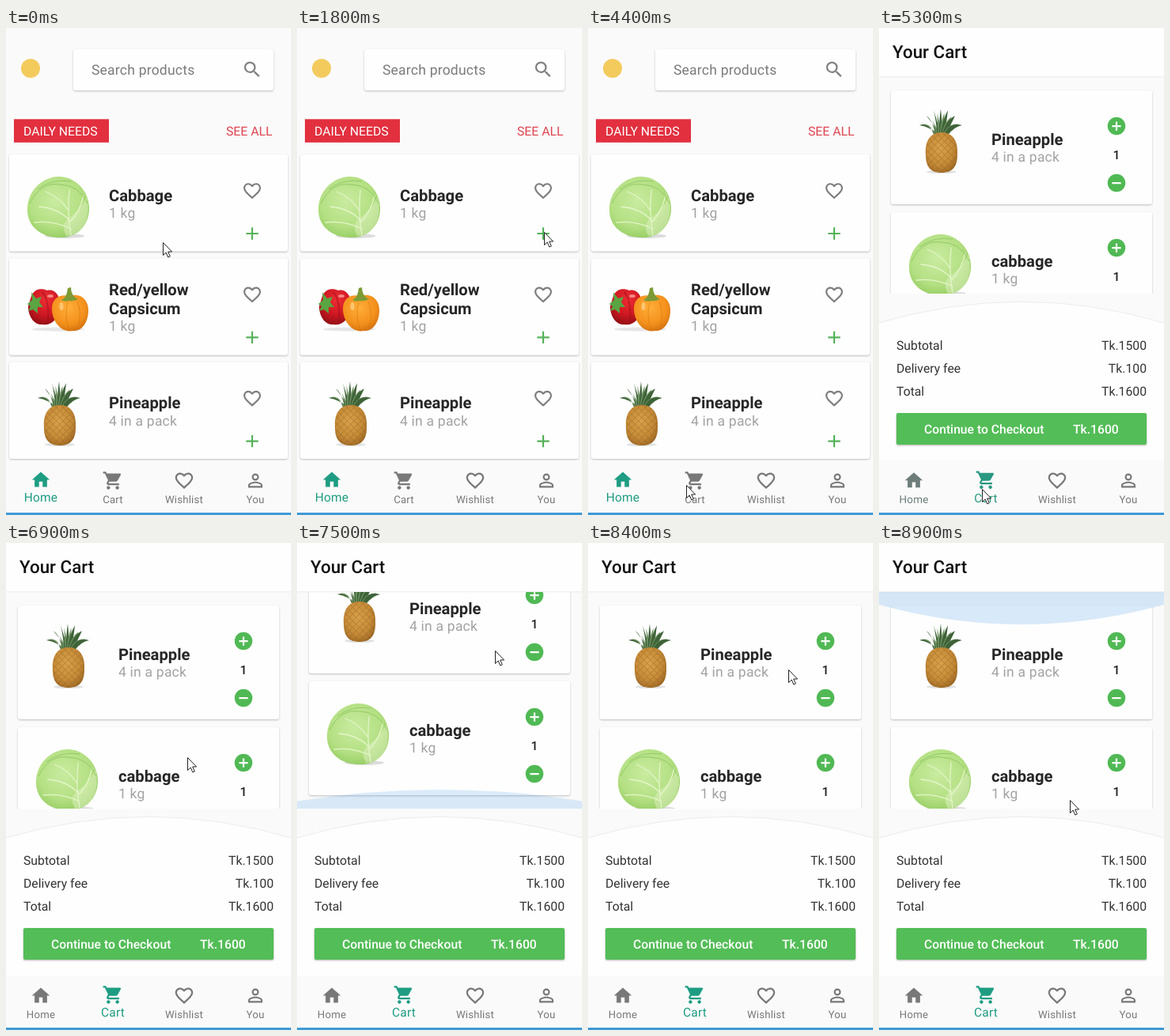
Write an HTML page that moves like this. It is 360 by 616 pixels and loops after 9 s.

```html
<!DOCTYPE html>
<html lang="en">
<head>
<meta charset="utf-8">
<title>Grocery cart</title>
<style>
  html, body { margin: 0; width: 100%; height: 100%; overflow: hidden; background: #fafafa; }
  svg { display: block; width: 360px; height: 616px; font-family: Roboto, sans-serif; text-rendering: geometricPrecision; }
  .card { fill: #fefefe; filter: drop-shadow(0 1px 1px rgba(0, 0, 0, .24)); }
  .title { font-size: 20.2px; font-weight: 700; fill: #262626; }
  .sub { font-size: 17.5px; letter-spacing: .22px; fill: #a2a2a2; }
  .hint { font-size: 17.5px; letter-spacing: .22px; fill: #7a7a7a; }
  .label { font-size: 15.77px; }
  .medium { font-size: 15.7px; font-weight: 500; }
  .head { font-size: 22.4px; font-weight: 500; fill: #111; }
  .tab { letter-spacing: .2px; }
</style>
</head>
<body>
<svg id="stage" viewBox="0 0 360 616" xmlns="http://www.w3.org/2000/svg"></svg>
<script>
const LOOP = 9000, STEP = 100;
const RED = '#e2303f', GREEN = '#55b259', SOFT = '#7f7f7f', GREY = [120, 120, 120], TEAL = [30, 157, 131];
const LIST_TOP = 62, LIST_END = 336, MAX_SCROLL = 58, SLOP = 18;

const PATHS = {
  search: 'M15.5 14h-.79l-.28-.27A6.47 6.47 0 0 0 16 9.5 6.5 6.5 0 1 0 9.5 16c1.61 0 3.09-.59 4.23-1.57l.27.28v.79l5 4.99L20.49 19zm-6 0C7.01 14 5 11.99 5 9.5S7.01 5 9.5 5 14 7.01 14 9.5 11.99 14 9.5 14z',
  heart: 'M16.5 3c-1.74 0-3.41.81-4.5 2.09C10.91 3.81 9.24 3 7.5 3 4.42 3 2 5.42 2 8.5c0 3.78 3.4 6.86 8.55 11.54L12 21.35l1.45-1.32C18.6 15.36 22 12.28 22 8.5 22 5.42 19.58 3 16.5 3zm-4.4 15.55l-.1.1-.1-.1C7.14 14.24 4 11.39 4 8.5 4 6.5 5.5 5 7.5 5c1.54 0 3.04.99 3.57 2.36h1.87C13.46 5.99 14.96 5 16.5 5c2 0 3.5 1.5 3.5 3.5 0 2.89-3.14 5.74-7.9 10.05z',
  home: 'M10 20v-6h4v6h5v-8h3L12 3 2 12h3v8z',
  cart: 'M7 18c-1.1 0-2 .9-2 2s.9 2 2 2 2-.9 2-2-.9-2-2-2zM1 2v2h2l3.6 7.59-1.35 2.45c-.16.28-.25.61-.25.96 0 1.1.9 2 2 2h12v-2H7.42c-.14 0-.25-.11-.25-.25l.03-.12.9-1.63h7.45c.75 0 1.41-.41 1.75-1.03l3.58-6.49A1 1 0 0 0 20 4H5.21l-.94-2zM17 18c-1.1 0-2 .9-2 2s.9 2 2 2 2-.9 2-2-.9-2-2-2z',
  person: 'M12 5.9a2.1 2.1 0 1 1 0 4.2 2.1 2.1 0 0 1 0-4.2m0 9c2.97 0 6.1 1.46 6.1 2.1v1.1H5.9V17c0-.64 3.13-2.1 6.1-2.1M12 4C9.79 4 8 5.79 8 8s1.79 4 4 4 4-1.79 4-4-1.79-4-4-4zm0 9c-2.67 0-8 1.34-8 4v3h16v-3c0-2.66-5.33-4-8-4z',
  add: 'M19 13h-6v6h-2v-6H5v-2h6V5h2v6h6z',
  plus: 'M12 2a10 10 0 1 0 0 20 10 10 0 0 0 0-20zm5 11h-4v4h-2v-4H7v-2h4V7h2v4h4z',
  minus: 'M12 2a10 10 0 1 0 0 20 10 10 0 0 0 0-20zm5 11H7v-2h10z'
};

const place = (cx, cy, size) => `translate(${cx - size / 2} ${cy - size / 2}) scale(${size / 24})`;
const icon = (name, cx, cy, color, size = 27) =>
  `<path d="${PATHS[name]}" fill="${color}" fill-rule="evenodd" transform="${place(cx, cy, size)}"/>`;
const text = (s, x, y, cls, more = '') => `<text x="${x}" y="${y}" class="${cls}" ${more}>${s}</text>`;
const rect = (x, y, w, h, more) => `<rect x="${x}" y="${y}" width="${w}" height="${h}" ${more}/>`;
const use = (id, x = 0, y = 0) => `<use href="#${id}" x="${x}" y="${y}"/>`;

// Thin curved leaves fanning out from the pineapple's neck
const leaves = Array.from({ length: 13 }, (_, i) => {
  const side = (i - 6) / 6, len = 34 - 6 * side * side - (i % 2) * 5;
  const tip = side * 27, droop = -len + 15 * side * side;
  return `<path d="M${side * 6 - 2.5} 0Q${tip * .45 - 2} ${-len * .62} ${tip} ${droop}Q${tip * .55 + 2} ${-len * .4} ${side * 6 + 2.5} 0z"
    fill="${i % 2 ? '#6f9160' : '#3f6339'}" transform="translate(67 481)"/>`;
}).join('');

const defs = `<defs>
  <radialGradient id="leaf" cx=".45" cy=".4" r=".65">
    <stop offset="0" stop-color="#c9eba0"/><stop offset=".65" stop-color="#b4e083"/><stop offset="1" stop-color="#93cb60"/>
  </radialGradient>
  <radialGradient id="red" cx=".55" cy=".3" r=".75">
    <stop offset="0" stop-color="#ee2d35"/><stop offset=".55" stop-color="#cf1822"/><stop offset="1" stop-color="#8d0d14"/>
  </radialGradient>
  <radialGradient id="orange" cx=".45" cy=".35" r=".75">
    <stop offset="0" stop-color="#ffae3a"/><stop offset=".6" stop-color="#f4911c"/><stop offset="1" stop-color="#c8680c"/>
  </radialGradient>
  <radialGradient id="gold" cx=".45" cy=".4" r=".7">
    <stop offset="0" stop-color="#d9a24a"/><stop offset=".6" stop-color="#c68b37"/><stop offset="1" stop-color="#94601f"/>
  </radialGradient>
  <pattern id="scales" width="6" height="6" patternUnits="userSpaceOnUse" patternTransform="rotate(45)">
    <path d="M0 0H6M0 0V6" stroke="#8a5a20" stroke-width="1.4" opacity=".45"/>
  </pattern>
  <g id="cabbage">
    <ellipse cx="74" cy="263" rx="25" ry="3" fill="#dcdcdc"/>
    <path d="M66 188C84 187 104 203 105 226C106 249 90 265 70 265C46 266 27 252 27 230C27 206 45 189 66 188z" fill="url(#leaf)"/>
    <path d="M76 263Q68 248 80 240Q92 232 102 214Q108 240 94 256Q86 263 76 263z" fill="#dcf0bd" opacity=".55"/>
    <g fill="none" stroke="#e3f5c8" stroke-width="1.3" stroke-linecap="round">
      <path d="M82 262Q77 234 80 205M80 243Q66 228 42 226M79 231Q68 214 50 207M81 245Q93 233 98 212M82 254Q60 243 36 246"/>
    </g>
    <path d="M30 222Q44 194 68 198Q92 198 103 222M40 204Q58 190 82 194" fill="none" stroke="#93c965" stroke-width="1"/>
  </g>
  <g id="capsicum">
    <ellipse cx="66" cy="381" rx="33" ry="2.5" fill="#e6e6e6"/>
    <path d="M32 339C36 329 46 329 52 332C62 329 70 340 68 354C66 368 57 377 46 375C35 376 28 364 28 352z" fill="url(#red)"/>
    <path d="M46 334Q55 345 53 373" fill="none" stroke="#9c1018" stroke-width="2" opacity=".5"/>
    <path d="M27 349L33 344 32 334 38 342 45 340 42 347 47 353 40 353 40 361 34 356 28 358 31 352z" fill="#5aa442"/>
    <ellipse cx="56" cy="339" rx="4" ry="2" fill="#ffb0aa" opacity=".7"/>
    <path d="M58 355C58 342 68 336 80 339C94 334 105 344 104 359C103 373 96 384 84 383C71 386 58 372 58 355z" fill="url(#orange)"/>
    <path d="M70 344Q77 341 78 329L82 328Q82 339 91 343Q84 346 80 345Q75 347 70 344z" fill="#7d9a35"/>
    <path d="M78 347Q73 363 80 382M90 346Q97 362 90 380" fill="none" stroke="#d4780f" opacity=".6"/>
    <ellipse cx="70" cy="352" rx="2.5" ry="5" fill="#ffe0a0" opacity=".6"/>
  </g>
  <g id="pineapple">
    <ellipse cx="68" cy="527" rx="19" ry="2" fill="#e0e0e0"/>
    ${leaves}
    ${['gold', 'scales'].map(fill => `<path d="M68 477C83 477 89 489 88 505C88 519 83 528 68 528C53 528 48 519 48 505C47 489 53 477 68 477z" fill="url(#${fill})"/>`).join('')}
  </g>
  <clipPath id="view">${rect(0, LIST_TOP, 360, LIST_END - LIST_TOP, '')}</clipPath>
</defs>`;

function homeCard(i, photo, lines, amount, y) {
  const top = 160 + i * 131.3;
  return rect(4, top, 352, 122.5, 'rx="3" class="card"') + use(photo) +
    lines.map((s, k) => text(s, 130, y + k * 23.5, 'title')).join('') +
    text(amount, 130, y + lines.length * 23.5 - 2, 'sub') +
    icon('heart', 311, top + 46, SOFT, 26.3) + icon('add', 311, top + 100, GREEN, 26.3);
}

function cartCard(i, photo, dx, dy, name, amount) {
  const top = 79 + i * 154;
  return rect(15, top, 330, 144, 'rx="3" class="card"') + use(photo, dx, dy) +
    text(name, 142, top + 69, 'title') + text(amount, 142, top + 90, 'sub') +
    icon('plus', 300, top + 45, '#50b954') + icon('minus', 300, top + 117, '#50b954') +
    text('1', 300, top + 87, 'medium', 'text-anchor="middle" fill="#222"');
}

const totals = [['Subtotal', 'Tk.1500'], ['Delivery fee', 'Tk.100'], ['Total', 'Tk.1600']].map(([name, sum], i) => {
  const y = 406.5 + i * 29.4;
  return text(name, 22, y, 'label', 'fill="#333"') + text(sum, 338, y, 'label', 'fill="#333" text-anchor="end"');
}).join('');

const TABS = [['home', 'Home', 44], ['cart', 'Cart', 135], ['heart', 'Wishlist', 225], ['person', 'You', 315]];

const stage = document.getElementById('stage');
stage.innerHTML = defs + rect(0, 0, 360, 616, 'fill="#fafafa"') + `
<g id="homePage">
  <circle cx="31" cy="51" r="12" fill="#f3cb5d"/>
  ${rect(85, 27, 253, 52, 'rx="3" class="card"')}
  ${text('Search products', 108, 59, 'hint')}
  ${icon('search', 311, 52.5, SOFT)}
  ${rect(10, 115.3, 120, 29.5, `fill="${RED}"`)}
  ${text('DAILY NEEDS', 22, 136, 'label', 'fill="#fff"')}
  ${text('SEE ALL', 278, 136, 'label', 'fill="#dd4450"')}
  ${homeCard(0, 'cabbage', ['Cabbage'], '1 kg', 218.5)}
  ${homeCard(1, 'capsicum', ['Red/yellow', 'Capsicum'], '1 kg', 338)}
  ${homeCard(2, 'pineapple', ['Pineapple'], '4 in a pack', 481)}
</g>
<g id="cartPage">
  <g clip-path="url(#view)">
    <g id="list">
      ${cartCard(0, 'pineapple', 11, -345, 'Pineapple', '4 in a pack')}
      ${cartCard(1, 'cabbage', 11, 73, 'cabbage', '1 kg')}
    </g>
    <path id="glow" fill="#2185e0"/>
  </g>
  ${rect(0, 0, 360, 61, 'fill="#fefefe" style="filter:drop-shadow(0 1px 1px rgba(0,0,0,.06))"')}
  ${text('Your Cart', 17, 38, 'head')}
  <path d="M-2 373.5Q180 319 362 373.5V560H-2z" fill="#fefefe" stroke="#ececec"/>
  ${totals}
  ${rect(22, 487, 316, 40, 'rx="2" fill="#53bd57" style="filter:drop-shadow(0 1px 1px rgba(0,0,0,.3))"')}
  ${text('Continue to Checkout', 57, 513, 'medium', 'fill="#fff"')}
  ${text('Tk.1600', 245, 513, 'medium', 'fill="#fff"')}
</g>
${rect(0, 547, 360, 66, 'fill="#fafafa"')}
${TABS.map(([name, label, x]) => `<g class="nav">${icon(name, x, 572.5, SOFT)}${text(label, x, 601, 'tab', 'text-anchor="middle"')}</g>`).join('')}
${rect(0, 613, 360, 3, 'fill="#3f9ad6"')}
<path id="cursor" d="M.5 .5V16.5L4.2 13 6.8 19 9.3 17.9 6.7 12H11.6z" fill="#fff" stroke="#222" stroke-linejoin="round"/>`;

// Pointer stops: time, x, y
const STOPS = [
  [0, 198, 271], [1000, 310, 257], [1300, 310, 257], [1800, 312, 258], [2200, 312, 258],
  [2900, 312, 528], [3000, 312, 528], [3100, 316, 532], [3300, 316, 531], [3500, 316, 531],
  [4100, 119, 576], [4300, 119, 576], [4500, 129, 579], [4900, 129, 579], [5100, 130, 583],
  [5400, 130, 583], [5900, 184, 454], [6500, 225, 225], [6900, 229, 271], [7100, 229, 271],
  [7700, 258, 89], [8100, 258, 84], [8900, 241, 325], [9000, 241, 325]
];

const clamp = v => Math.min(1, Math.max(0, v));
const mix = (a, b, p) => a + (b - a) * p;
const blend = p => `rgb(${GREY.map((g, i) => Math.round(mix(g, TEAL[i], p)))})`;
const byId = id => document.getElementById(id);
const [homePage, cartPage, list, glow, cursor] = ['homePage', 'cartPage', 'list', 'glow', 'cursor'].map(byId);
const navs = [...document.querySelectorAll('.nav')];

function pointer(t) {
  const i = STOPS.findIndex(s => s[0] > t);
  const [t0, x0, y0] = STOPS[i - 1], [t1, x1, y1] = STOPS[i];
  const p = (t - t0) / (t1 - t0), e = p * p * (3 - 2 * p);
  return [mix(x0, x1, e), mix(y0, y1, e)];
}

// Scroll offset and overscroll pull follow the dragging pointer
function drag(t, y) {
  if (t < 7100) return { scroll: 0, pull: 0 };
  const down = t > 8100;
  const moved = Math.max(0, (down ? y - 84 : 271 - y) - SLOP);
  const part = Math.min(MAX_SCROLL, moved);
  const fade = down ? 1 : clamp((8100 - t) / 400);
  return { down, scroll: down ? MAX_SCROLL - part : part, pull: clamp((moved - part) / 100) * fade };
}

function drawGlow({ down, pull }) {
  const base = down ? LIST_TOP : LIST_END, dir = down ? 1 : -1;
  const edge = base + dir * 16 * pull, peak = base + dir * 66 * pull;
  glow.setAttribute('d', `M0 ${base}V${edge}Q180 ${peak} 360 ${edge}V${base}z`);
  glow.setAttribute('opacity', pull * (down ? .17 : .27));
}

function drawTab(nav, i, on) {
  const [mark, label] = nav.children;
  mark.setAttribute('fill', blend(on));
  mark.setAttribute('transform', place(TABS[i][2], 572.5 - on, 27));
  label.setAttribute('fill', blend(on));
  label.setAttribute('font-size', mix(13.2, 15.5, on));
  label.setAttribute('y', mix(601, 599.3, on));
}

function draw(t) {
  const [x, y] = pointer(t), inCart = t >= 5100;
  const state = drag(t, y), turn = inCart ? clamp((t - 5050) / 290) : 0;
  homePage.style.display = inCart ? 'none' : '';
  cartPage.style.display = inCart ? '' : 'none';
  list.setAttribute('transform', `translate(0 ${-state.scroll})`);
  drawGlow(state);
  navs.forEach((nav, i) => drawTab(nav, i, [1 - turn, turn, 0, 0][i]));
  cursor.setAttribute('transform', `translate(${Math.round(x)} ${Math.round(y)})`);
}

const start = performance.now();
function tick() {
  const t = (performance.now() - start) % LOOP;
  draw(Math.floor(t / STEP) * STEP);
  requestAnimationFrame(tick);
}
tick();
</script>
</body>
</html>
```
